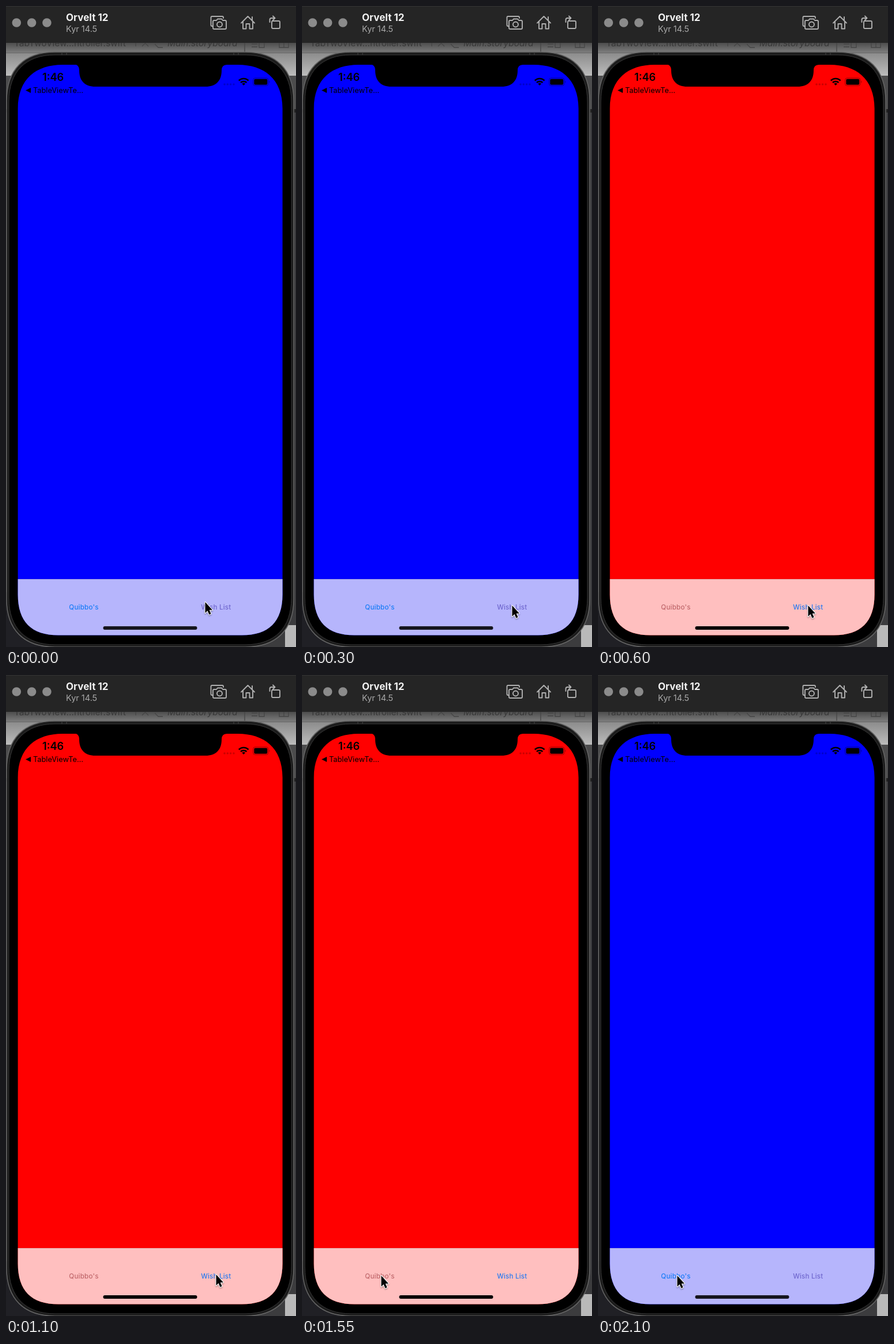
An HTML page that plays this animation: 503 by 1113 pixels, repeating every 2.6 s.

```html
<!DOCTYPE html>
<html lang="en">
<head>
<meta charset="utf-8">
<title>Tab bar demo</title>
<style>
  html, body { margin: 0; width: 100%; height: 100%; overflow: hidden; background: #222; }
  svg { display: block; width: 503px; height: 1113px; font-family: Inter, "Open Sans", sans-serif; }
  .line { fill: none; stroke: #b0b0b0; stroke-width: 1.9; stroke-linejoin: round; stroke-linecap: round; }
  .dim { fill: none; stroke: #454545; stroke-width: 1.3; }
  .tab { font-size: 11.6px; font-weight: 500; letter-spacing: .2px; text-anchor: middle; }
</style>
</head>
<body>
<svg viewBox="0 0 503 1113" xmlns="http://www.w3.org/2000/svg">
  <defs>
    <linearGradient id="strip" x2="0" y2="1">
      <stop stop-color="#4d4d4d"/><stop offset="1" stop-color="#808080"/>
    </linearGradient>
    <linearGradient id="behind" x2="0" y2="1">
      <stop stop-color="#8c8c8c"/><stop offset="1" stop-color="#bcbcbc"/>
    </linearGradient>
    <clipPath id="display">
      <path d="M98 102H402C347 102 402 102 402 102C447 102 479.600 126 479.600 178V1022C479.600 1069 456 1092.600 409 1092.600H91C44 1092.600 20.600 1069 20.600 1022V178C20.600 126 53 102 98 102Z"/>
    </clipPath>
    <filter id="shadow" x="-50%" y="-30%" width="200%" height="180%">
      <feDropShadow dx="0" dy="1.5" stdDeviation="1.3" flood-opacity=".35"/>
    </filter>
  </defs>

  <!-- window behind the device -->
  <rect width="503" height="1113" fill="#3c3c3e"/>
  <rect y="82" width="503" height="39" fill="url(#behind)"/>
  <rect y="121" width="503" height="58" fill="#4c4c4d"/>
  <rect y="179" width="503" height="6" fill="#222"/>
  <rect y="1018" width="250" height="95" fill="#202025"/>
  <rect x="484" y="1075" width="19" height="38" fill="#b9b9b9"/>
  <rect y="64" width="503" height="18" fill="url(#strip)"/>
  <g font-size="15.5" fill="#383838">
    <text x="14" y="70">TabTwoView…ntroller.swift</text>
    <text x="280" y="70" font-style="italic">Main.storyboard</text>
  </g>
  <path class="dim" d="M225 64V70M414 64V81M236 70l11-11M236 59l11 11M426 66H436M426 71H436M439 60h9v12h-9zM474 60h16v12h-16zM482 60v12M258 66l6 6h8"/>
  <path d="M0 81.5H503" stroke="#666"/>

  <!-- title bar -->
  <rect width="503" height="64" fill="#252525"/>
  <path d="M0 .5H503" stroke="#343434"/>
  <g fill="#8b8b8b">
    <circle cx="18.300" cy="29" r="7.800"/><circle cx="44.600" cy="29" r="7.800"/><circle cx="70.900" cy="29" r="7.800"/>
  </g>
  <text x="104" y="26" font-size="17" font-weight="700" fill="#f2f2f2">Orvelt 12</text>
  <text x="104" y="45" font-size="14.5" fill="#a9a9a9">Kyr 14.5</text>
  <g class="line">
    <path d="M359 35h-1.500a2 2 0 0 1-2-2V20a2 2 0 0 1 2-2H375a2 2 0 0 1 2 2v1"/>
    <path d="M361 25h4l2-2.500h7l2 2.500h4a2 2 0 0 1 2 2v11a2 2 0 0 1-2 2H361a2 2 0 0 1-2-2V27a2 2 0 0 1 2-2z"/>
    <circle cx="370.500" cy="32" r="4.500"/>
    <path d="M408 29.500L419.500 18L431 29.500M411 27V39.500H416.500V31H422.500V39.500H428V27M427 25V19"/>
    <path d="M463 26h10a2 2 0 0 1 2 2v9a2 2 0 0 1-2 2h-10a2 2 0 0 1-2-2V28a2 2 0 0 1 2-2zM457.500 28V24a3 3 0 0 1 3-3H466M463 17.500l3.500 3.500l-3.500 3.500"/>
  </g>

  <!-- device -->
  <path d="M85 80H415C469 80 499 110 499 165V1030C499 1083 469 1113 415 1113H85C31 1113 1 1083 1 1030V165C1 110 31 80 85 80Z" fill="#1b1b1b" stroke="#656565" stroke-width="1.500"/>
  <path d="M85 85H415C466 85 495 114 495 166V1028C495 1080 466 1109 415 1109H85C34 1109 5 1080 5 1028V166C5 114 34 85 85 85Z" fill="#000" stroke="#373737"/>
  <path d="M97 80v5M105 80v5M395 80v5M403 80v5" stroke="#444"/>

  <g clip-path="url(#display)">
    <rect id="page" x="20" y="102" width="460" height="991" fill="#00f"/>
    <rect id="bar" x="20" y="995" width="460" height="98" fill="#b6b5fc"/>
    <path d="M20 995.300H480" stroke="#000" stroke-opacity=".2" stroke-width=".7"/>
    <path d="M114 101H118Q127 102 127 112C127 130 137 140 155 140H346C364 140 374 130 374 112Q374 102 383 102V101Z"/>
  </g>

  <!-- status bar -->
  <text x="63" y="130" font-size="18.200" font-weight="600">1:46</text>
  <path d="M34 146.500L43 142V151Z"/>
  <text x="47" y="151" font-size="12.800">TableViewTe…</text>
  <g opacity=".2">
    <circle cx="379" cy="136" r="1.800"/><circle cx="384.300" cy="136" r="1.800"/>
    <circle cx="389.600" cy="136" r="1.800"/><circle cx="395" cy="136" r="1.800"/>
  </g>
  <g fill="none" stroke="#000" stroke-width="2.500">
    <path d="M403.800 129.500a12 12 0 0 1 16.800 0M407 133a7.500 7.500 0 0 1 10.400 0"/>
  </g>
  <path d="M412.200 138l-2.800-2.900a4 4 0 0 1 5.600 0z"/>
  <rect x="428.500" y="125" width="26.500" height="13.500" rx="3.800" fill="none" stroke="#000" stroke-opacity=".38"/>
  <rect x="430.300" y="126.800" width="23" height="10" rx="2.200"/>
  <path d="M456.500 129.500q2 2.200 0 4.500z" fill-opacity=".4"/>

  <!-- tab bar -->
  <text id="first" class="tab" x="135" y="1048" fill="#197df7">Quibbo's</text>
  <text id="second" class="tab" x="364.300" y="1048" fill="#7068cf">Wish List</text>
  <rect id="home" x="168.500" y="1077" width="163" height="6" rx="3" fill="#15151d"/>

  <g id="cursor">
    <path d="M1.500 2V21L5.500 17L8.400 23.700L11.600 22.300L8.700 15.700H14Z" stroke="#fff" stroke-width="2" paint-order="stroke" stroke-linejoin="round" filter="url(#shadow)"/>
  </g>
</svg>
<script>
  const LOOP = 2600, STEP = 50, RED_AT = 450, BLUE_AT = 1900;

  // Pointer tip: start time, then one position per step.
  const moves = [
    [0, [[344, 1033], [345, 1034], [348, 1036], [353, 1038], [358, 1039], [361, 1039], [363, 1039]]],
    [1100, [[363, 1039], [351, 1041], [314, 1047], [247, 1056], [165, 1062],
            [94, 1063], [57, 1060], [78, 1052], [116, 1044], [136, 1041]]]
  ];

  const play = (id, frames) => document.getElementById(id).animate(
    frames.map(([time, style]) => ({ offset: time / LOOP, easing: 'step-end', ...style })),
    { duration: LOOP, iterations: Infinity });

  const swapFill = (id, blue, red) => play(id, [
    [0, { fill: blue }], [RED_AT, { fill: red }],
    [BLUE_AT, { fill: blue }], [LOOP, { fill: blue }]
  ]);

  swapFill('page', '#0000ff', '#ff0000');
  swapFill('bar', '#b6b5fc', '#ffbfbf');
  swapFill('first', '#197df7', '#c0686c');
  swapFill('second', '#7068cf', '#277af0');
  swapFill('home', '#15151d', '#000000');

  const place = ([x, y]) => ({ transform: `translate(${x}px, ${y}px)` });
  const path = moves.flatMap(([start, points]) =>
    points.map((point, i) => [start + i * STEP, place(point)]));
  play('cursor', [...path, [LOOP, path.at(-1)[1]]]);
</script>
</body>
</html>
```
